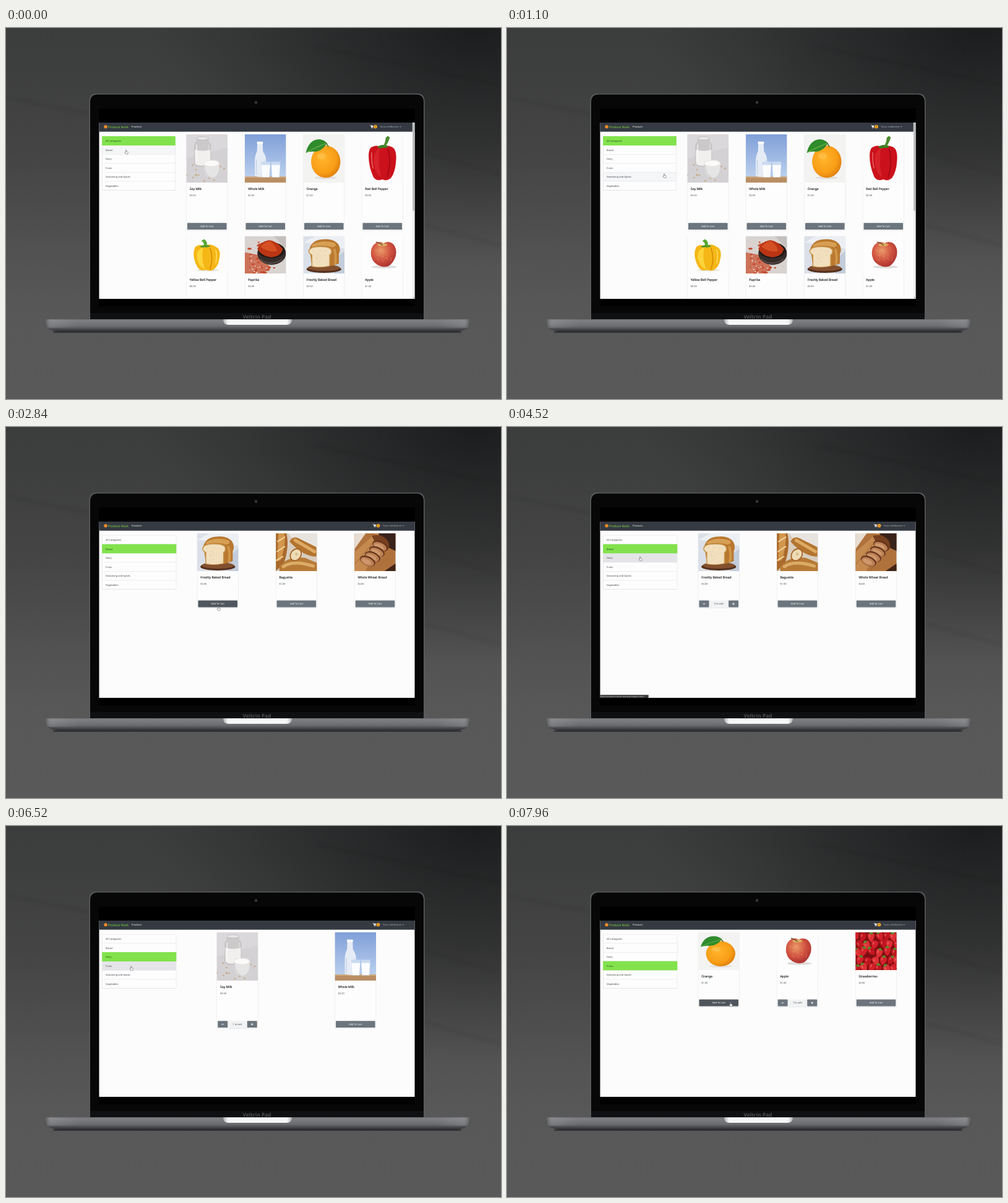
An HTML page for the animation above (8 s loop, 800x600 px).

```html
<!DOCTYPE html>
<html lang="en">
<head>
<meta charset="utf-8">
<title>Shop demo on a laptop</title>
<style>
html, body { margin: 0; width: 100%; height: 100%; overflow: hidden; background: #4a4a4a; }
svg { display: block; width: 100vw; height: 100vh; }
text { font-family: "Noto Sans", "Open Sans", sans-serif; text-rendering: geometricPrecision; }
.body { font-size: 3.95px; fill: #42464b; }
.title { font-size: 5.05px; fill: #212529; stroke: #212529; stroke-width: .14px; }
.btn { font-size: 3.95px; fill: #fff; text-anchor: middle; }
</style>
</head>
<body>
<svg id="stage" viewBox="0 0 800 600">
  <defs>
    <linearGradient id="wall" x1="0" y1="0" x2="0" y2="1">
      <stop offset="0" stop-color="#3b3c3c"/><stop offset=".33" stop-color="#444"/>
      <stop offset=".5" stop-color="#4c4c4c"/><stop offset=".65" stop-color="#545454"/>
      <stop offset=".78" stop-color="#585858"/><stop offset="1" stop-color="#595959"/>
    </linearGradient>
    <radialGradient id="dusk" gradientUnits="userSpaceOnUse" cx="760" cy="-20" r="540" gradientTransform="translate(0 6) scale(1 .72)">
      <stop offset="0" stop-color="#151617" stop-opacity=".85"/>
      <stop offset=".5" stop-color="#1d1e1f" stop-opacity=".5"/>
      <stop offset="1" stop-color="#2a2b2b" stop-opacity="0"/>
    </radialGradient>
    <linearGradient id="metal" x1="0" y1="0" x2="0" y2="1">
      <stop offset="0" stop-color="#6c6e71"/><stop offset=".12" stop-color="#7d7f82"/>
      <stop offset=".55" stop-color="#6a6c70"/><stop offset=".75" stop-color="#4d4f53"/>
      <stop offset="1" stop-color="#26282b"/>
    </linearGradient>
    <linearGradient id="ends" x1="0" y1="0" x2="1" y2="0">
      <stop offset="0" stop-color="#222" stop-opacity=".5"/><stop offset=".015" stop-color="#bbb" stop-opacity=".2"/>
      <stop offset=".08" stop-color="#bbb" stop-opacity="0"/><stop offset=".92" stop-color="#bbb" stop-opacity="0"/>
      <stop offset=".985" stop-color="#bbb" stop-opacity=".2"/><stop offset="1" stop-color="#222" stop-opacity=".5"/>
    </linearGradient>
    <linearGradient id="notch" x1="0" y1="0" x2="1" y2="0">
      <stop offset="0" stop-color="#aeb0b2"/><stop offset=".07" stop-color="#f6f6f6"/>
      <stop offset=".93" stop-color="#f6f6f6"/><stop offset="1" stop-color="#aeb0b2"/>
    </linearGradient>
    <linearGradient id="sky" x1="0" y1="0" x2="0" y2="1">
      <stop offset="0" stop-color="#7f9fd8"/><stop offset="1" stop-color="#c3d6f0"/>
    </linearGradient>
    <radialGradient id="peel" cx=".4" cy=".4" r=".65">
      <stop offset="0" stop-color="#ffb52c"/><stop offset=".7" stop-color="#f99d16"/><stop offset="1" stop-color="#dc7d0c"/>
    </radialGradient>
    <radialGradient id="skin" cx=".4" cy=".35" r=".7">
      <stop offset="0" stop-color="#eb9968"/><stop offset=".55" stop-color="#d0523f"/><stop offset="1" stop-color="#a8302f"/>
    </radialGradient>
    <filter id="soft" x="-20%" y="-200%" width="140%" height="500%"><feGaussianBlur stdDeviation="3"/></filter>
    <clipPath id="view"><rect x="150.5" y="153" width="510" height="285"/></clipPath>
  </defs>

  <rect width="800" height="600" fill="url(#wall)"/>
  <rect width="800" height="600" fill="url(#dusk)"/>
  <g filter="url(#soft)" fill="none" stroke="#000" stroke-opacity=".08" stroke-width="5">
    <path d="M0 112L140 140M500 30L800 92M676 200L800 238M676 318L800 352"/>
  </g>

  <path d="M134.500 471V119Q134.500 106 147 106H664Q676.500 106 676.500 119V471Z" fill="#5b5d5f"/>
  <path d="M136 471V120Q136 107.500 148 107.500H663Q675 107.500 675 120V471Z" fill="#070708"/>
  <rect x="150" y="130" width="511" height="320" fill="#000"/>
  <rect x="136" y="461" width="539" height="10" fill="#0f1011"/>
  <circle cx="404" cy="120.5" r="2.4" fill="#2b2c2e"/><circle cx="404" cy="120.5" r="1" fill="#505255"/>
  <text x="405.5" y="469.8" text-anchor="middle" font-size="8.4" font-weight="700" fill="#4b4d4f">Veltrin Pad</text>
  <rect x="76" y="490.500" width="660" height="2.500" rx="1.200" fill="#252628" opacity=".7"/>
  <g id="base">
    <path d="M62.500 473Q62.500 471 65 471H748Q750.500 471 750.500 473V482Q747 488 728 491.500H86Q66 488 62.500 482Z" fill="url(#metal)"/>
    <path d="M62.500 473Q62.500 471 65 471H748Q750.500 471 750.500 473V482L748 485H65L62.500 482Z" fill="url(#ends)"/>
  </g>
  <path d="M351 471.200H462Q462 480 453 480H360Q351 480 351 471.200Z" fill="url(#notch)"/>

  <g id="app" clip-path="url(#view)"></g>
</svg>
<script>
const LOOP = 8000;
const app = document.getElementById('app');
const CATEGORIES = ['All Categories', 'Bread', 'Dairy', 'Fruits', 'Seasoning and Spices', 'Vegetables'];
const ROW_H = 14.53, LIST_X = 155.5, LIST_Y = 175.3, CARD_W = 66.5, BTN_W = 63.6, BTN_H = 10.8;

const rect = (x, y, w, h, fill, more = '') => `<rect x="${x}" y="${y}" width="${w}" height="${h}" fill="${fill}" ${more}/>`;
const oval = (x, y, rx, ry, fill, more = '') => `<ellipse cx="${x}" cy="${y}" rx="${rx}" ry="${ry}" fill="${fill}" ${more}/>`;
const path = (d, fill, more = '') => `<path d="${d}" fill="${fill}" ${more}/>`;
const line = (d, stroke, w) => path(d, 'none', `stroke="${stroke}" stroke-width="${w}" stroke-linecap="round"`);
const text = (x, y, s, cls, more = '') => `<text x="${x}" y="${y}" class="${cls}" ${more}>${s}</text>`;

function seeded(seed) {
  return () => (seed = (seed * 16807) % 2147483647) / 2147483647;
}

// Scatters n shapes over a 66 x 60 picture.
function scatter(n, seed, draw) {
  const rnd = seeded(seed);
  return Array.from({ length: n }, () => draw(rnd() * 66, rnd() * 60, rnd())).join('');
}

function strawberries() {
  const rnd = seeded(77);
  let s = rect(0, 0, 66, 60, '#7d0d10');
  for (let r = 0; r < 5; r++) for (let c = 0; c < 6; c++) {
    const x = c * 12 + (r % 2) * 6 + rnd() * 3, y = r * 13 + 3 + rnd() * 4;
    s += `<g transform="translate(${x} ${y}) rotate(${rnd() * 70 - 35})">` +
      path('M-5.500 -4Q0 -8 5.500 -4Q6 4 0 8.500Q-6 4 -5.500 -4Z', ['#d3202a', '#c0161f', '#dd3035'][(r + c) % 3]) +
      oval(-2, -1, 1, 2.2, '#f0777a', 'opacity=".7"') +
      (rnd() > .55 ? path('M-4 -5L0 -8L4 -5L0 -3.500Z', '#5d8a2c') : '') + '</g>';
  }
  return s;
}

// Pictures are drawn in a 66 x 60 box and stretched to the card.
const ART = {
  soy: rect(0, 0, 66, 60, '#d3d1d3') + path('M0 0H66V16L0 30Z', '#dad8da') +
    scatter(18, 5, (x, y) => oval(x, 34 + y * .42, 1.5, 1, '#c8ad8f')) +
    path('M17 5H35V9Q39 11 39 15V36Q38 40 26 40Q14 40 13 36V15Q13 11 17 9Z', '#cbc9ca', 'stroke="#b5b3b4" stroke-width=".5"') +
    path('M13.500 19Q26 22 38.500 19V36Q37 39 26 39Q15 39 14 36Z', '#f2f0ee') +
    oval(26, 5, 9.5, 2, '#e9e8e8', 'stroke="#b5b3b4" stroke-width=".6"') + line('M16.500 13V33', '#fff', 1) + line('M36 13V18', '#eee', .8) +
    path('M27 36Q27 32 40 32Q53 32 53 36Q53 54 40 54Q27 54 27 36Z', '#e6e5e5') +
    oval(40, 36, 12, 3.4, '#fbfaf8') + line('M28 38Q29 51 38 53', '#bab8b8', .7),
  milk: rect(0, 0, 66, 60, 'url(#sky)') + rect(0, 52.5, 66, 7.5, '#b98e63') + rect(0, 52.5, 66, 1.5, '#d0aa80') +
    path('M20 11H28.500L29 21Q34 27 34 32V52Q25 54 16 52V32Q16 27 19.500 21Z', '#e6ecf5') +
    rect(19.5, 9, 9.5, 3, '#fff', 'rx=".6"') + line('M18.500 32V50', '#c3d2e7', 1.2) + line('M31.500 32V50', '#cddaeb', 1) +
    [26, 42].map(x => path(`M${x} 34H${x + 15}L${x + 13.5} 53.500H${x + 1.5}Z`, '#c9daf0') +
      path(`M${x + .5} 38H${x + 14.5}L${x + 13} 53H${x + 2}Z`, '#fbfcfe')).join(''),
  orange: rect(0, 0, 66, 60, '#f3f3f2') + oval(36, 54, 18, 1.8, '#e2e0dc') + oval(36, 34, 23.5, 20, 'url(#peel)') +
    oval(29, 27, 7, 4, '#ffc95c', 'opacity=".5"') +
    path('M4 23Q8 9 21 6.500Q32 5 38 11Q30 21 19 21.500Q10 21 4 23Z', '#2f8b2c') +
    line('M5 22.500Q20 16 37 11', '#78b950', .8) + line('M37 11L40 15', '#52702a', 1.5),
  redPepper: rect(0, 0, 66, 60, '#fcfcfc') +
    path('M14 17Q22 12 31 16Q40 12 49 16Q56 19 55 32Q54 47 47 54Q40 59 33 56Q24 59 18.500 53Q11 40 11 27Q11 20 14 17Z', '#cb111c') +
    path('M29 18Q25 36 31 53Q20 49 19 32Q19 20 29 18Z', '#dc2a30', 'opacity=".7"') + line('M42 18Q48 34 41 53', '#9d0914', 1.5) +
    line('M16 23Q15 32 18 42', '#f27a78', 1.2) + path('M25 15.500Q33 11 43 15Q39 18 33 16.500Q28 19 25 15.500Z', '#3d7d25') +
    path('M34 15Q38 10 38.500 4L42 2L45 4Q42 11 38 15Z', '#4c8a2e'),
  yellowPepper: rect(0, 0, 66, 60, '#fcfcfc') + oval(34, 54.5, 18, 1.8, '#e6e2d8') +
    path('M14 18Q20 12 28 16Q38 11 47 17Q56 21 53 36Q51 50 43 54Q38 57 32 54Q23 57 18 50Q10 36 12 24Z', '#f5b716') +
    path('M27 18Q23 36 30 53Q20 50 17 36Q15 22 27 18Z', '#ffd43a') + line('M38 19Q44 36 38 53', '#d68c08', 1.5) +
    line('M47 22Q50 32 47 43', '#ffdf62', 1.5) + path('M21 17Q29 12 39 16Q33 19 29 17.500Q25 19 21 17Z', '#4c9a2c') +
    path('M28 15Q29 11 24 8L28 5Q34 8 33 15Z', '#57a834'),
  paprika: rect(0, 0, 66, 60, '#d8d3d0') + path('M0 26L20 30L42 50L30 60H0Z', '#cc7258') + path('M46 0H66V20Z', '#c3c0be') +
    scatter(90, 12, (x, y, r) => oval(x * .72, 8 + y * .85, .8 + r * 1.8, .6 + r * .9, r > .5 ? '#c4472a' : '#e5cabf')) +
    oval(43, 28, 23, 18, '#362d2b') + line('M25 37Q41 50 60 37', '#6b605b', 1) +
    oval(42.5, 23, 21.5, 12.5, '#201917') +
    path('M20 20Q26 9 39 6.500Q53 9 61 21Q58 32 44 34Q27 33 20 20Z', '#bb3514') +
    path('M25 17Q32 9 40 8Q49 13 52 24Q38 27 25 17Z', '#d44f22'),
  bread: rect(0, 0, 66, 60, '#dbe0e8') + path('M0 10L20 0H66V20Z', '#eceff4') + path('M44 42L66 24V60H50Z', '#c3ccda') +
    oval(33, 53, 28, 6, '#54301d') + oval(33, 51, 26, 5, '#83502f') +
    path('M10 20Q14 7 29 5.500Q48 3 56 13Q61 21 57 29V44Q44 51 14 49Z', '#b9782f') +
    path('M14 14Q30 5 50 11Q55 15 48 18Q31 13 14 17Z', '#d79f54') + line('M50 22Q53 32 51 44', '#cf9548', 4) +
    path('M8 24Q9 16 27 16Q46 16 46 24Q46 29 43 31V48Q27 52 13 49V31Q8 28 8 24Z', '#c8964f') +
    path('M9.500 24.500Q11 17.500 27 17.500Q44.500 17.500 44.500 24.500Q44.500 28 41.500 30V47.500Q27 51 14.500 48V30Q9.500 27 9.500 24.500Z', '#f1dfbd') +
    scatter(18, 31, (x, y) => oval(16 + x * .36, 22 + y * .38, .8, .6, '#dfcaa2')),
  apple: rect(0, 0, 66, 60, '#fdfdfd') + oval(36, 49.5, 20, 2.3, '#dedbd9') +
    path('M35 11.500Q43 7 50 12.500Q57 20 54.500 32Q50 45 42 48.500Q36 50 31 48.500Q18 45 15 32Q13 17 23 11Q30 8 35 11.500Z', 'url(#skin)') +
    oval(33, 14, 8, 2.6, '#dbab62') + line('M33 15Q30 11 23 9.500', '#583923', 1.1) +
    scatter(24, 9, (x, y) => oval(21 + x * .45, 18 + y * .4, .5, .6, '#f0ad85')),
  baguette: rect(0, 0, 66, 60, '#d8cdbe') + path('M20 0H66V24L42 30Z', '#e7e4e0') +
    path('M0 0H17Q22 20 13 48L0 60Z', '#a9692c') + path('M4 0H14Q16 20 8 42L2 45Z', '#d3974c') +
    line('M3 13L14 6M2 29L14 21M1 43L11 37', '#f0d4a0', 2) +
    path('M22 13Q27 3 37 8L65 22V37Q44 37 22 13Z', '#b3742f') + line('M31 11L62 29', '#dfaa64', 5) +
    path('M5 53Q20 35 47 39L66 47V60H6Z', '#b77a36') + line('M12 53Q28 42 60 52', '#dcac67', 5) +
    oval(32, 34, 9, 11, '#a5652a', 'transform="rotate(38 32 34)"') + oval(32, 34, 7.2, 9.2, '#efdcb6', 'transform="rotate(38 32 34)"') +
    oval(33, 33, 2, 2.6, '#d6bc8b'),
  wheat: rect(0, 0, 66, 60, '#b0723c') + path('M0 60V30L34 0H54L17 60Z', '#c58a50') +
    line('M0 50L42 0M23 60L66 5', '#98602e', .8) + path('M0 0H18L0 25Z', '#e7ddd3') + path('M38 0H66V28L53 22Z', '#39231b') +
    path('M66 48L48 60H66Z', '#402517') + path('M28 4Q42 -1 53 11Q60 24 49 29Q36 24 28 4Z', '#77401f') +
    [[41, 20], [36, 29], [29, 37], [21, 44]].map(([x, y]) => `<g transform="rotate(24 ${x} ${y})">` +
      oval(x, y, 13, 7.5, '#63331b') + oval(x, y + 1, 11.5, 6.2, '#bd8055') + oval(x - 1, y + 1.5, 8, 3.5, '#ce986c') + '</g>').join(''),
  strawberries: strawberries()
};

const GOODS = {
  soy: ['Soy Milk', '3.50'], milk: ['Whole Milk', '2.50'], orange: ['Orange', '1.00'],
  redPepper: ['Red Bell Pepper', '0.50'], yellowPepper: ['Yellow Bell Pepper', '0.50'], paprika: ['Paprika', '5.00'],
  bread: ['Freshly Baked Bread', '3.00'], apple: ['Apple', '1.00'], baguette: ['Baguette', '1.00'],
  wheat: ['Whole Wheat Bread', '4.00'], strawberries: ['Strawberries', '2.00']
};

const row = (ids, x, step, y, imgH, cardH) => ids.map((id, i) => ({ id, x: x + i * step, y, imgH, cardH }));
const PAGES = [
  { from: 0, row: 0, cards: [
    ...row(['soy', 'milk', 'orange', 'redPepper'], 291.5, 94.5, 172, 78, 155),
    ...row(['yellowPepper', 'paprika', 'bread', 'apple'], 291.5, 94.5, 336.5, 60.5, 120)] },
  { from: 1720, row: 1, cards: row(['bread', 'baguette', 'wheat'], 309, 127.1, 172, 61, 120.3) },
  { from: 4640, row: 2, cards: row(['soy', 'milk'], 340.7, 190.8, 172, 78, 155) },
  { from: 6640, row: 3, cards: row(['orange', 'apple', 'strawberries'], 309, 127.1, 172, 61, 120.3) }
];

// Moments at which one piece of a product goes into the cart.
const ADDS = { bread: [2960, 3560, 3780], soy: [5740], apple: [7460] };
const PRESSES = [[1600, 1720], [4490, 4640], [6490, 6640]];
const STATUS = [[1560, 2250, 'bread'], [4420, 5460, 'dairy'], [6560, 7250, 'fruits']];
// Pointer stops: time, x, y of the tip.
const STOPS = [
  [0, 194, 197.5], [250, 196, 199], [1100, 254, 236], [1540, 207, 197], [1800, 207, 197], [2450, 336, 282],
  [2840, 343, 290.5], [3080, 344, 288], [3400, 365, 285], [3860, 365, 285], [4270, 216, 213], [4450, 215, 210],
  [4700, 215, 210], [5340, 345, 251.5], [5640, 373, 319], [5860, 373, 319], [6400, 202, 227], [6700, 202, 227],
  [7330, 468, 284], [7560, 468, 284], [7920, 361, 285.5], [8000, 361, 285.5]
];

const within = (t, [a, b]) => t >= a && t < b;
const count = (id, t) => (ADDS[id] || []).filter(at => t >= at).length;

function pointer(t) {
  const i = Math.max(1, STOPS.findIndex(s => s[0] > t));
  const [t0, x0, y0] = STOPS[i - 1], [t1, x1, y1] = STOPS[i];
  const u = (t - t0) / (t1 - t0), e = u * u * (3 - 2 * u);
  return [x0 + (x1 - x0) * e, y0 + (y1 - y0) * e];
}

function button(x, y, w, label, over) {
  return rect(x, y, w, BTN_H, over ? '#50565d' : '#6c757d', 'rx=".8"') + text(x + w / 2, y + 6.8, label, 'btn');
}

function cardButtons(c, t, mx, my) {
  const x = c.x + 1.5, y = c.y + c.cardH - 11.7, right = x + BTN_W - 16, n = count(c.id, t);
  const over = (bx, w) => mx >= bx && mx <= bx + w && my >= y && my <= y + 11.5;
  if (!n) return button(x, y, BTN_W, 'Add To Cart', over(x, BTN_W));
  return rect(x, y, BTN_W, BTN_H, '#f1f2f3') + button(x, y, 16, '', over(x, 16)) + button(right, y, 16, '', over(right, 16)) +
    line(`M${x + 6.5} ${y + 5.4}h3M${right + 6.5} ${y + 5.4}h3M${right + 8} ${y + 3.9}v3`, '#fff', .9) +
    text(x + BTN_W / 2, y + 6.8, `${n} in cart`, 'btn', 'style="fill:#33383c"');
}

function cardFace(c) {
  const [name, price] = GOODS[c.id];
  return rect(c.x - .2, c.y + .5, CARD_W + .4, c.cardH + .3, '#e4e4e8', 'rx="1"') + rect(c.x + .3, c.y + .3, CARD_W - .6, c.cardH - .6, '#fdfdfd') +
    `<svg x="${c.x}" y="${c.y}" width="${CARD_W}" height="${c.imgH}" viewBox="0 0 66 60" preserveAspectRatio="none">${ART[c.id]}</svg>` +
    text(c.x + 5.3, c.y + c.imgH + 11.7, name, 'title') + text(c.x + 5.3, c.y + c.imgH + 21.9, '$' + price, 'body');
}

function list(page, w, hover, pressed) {
  const h = ROW_H * CATEGORIES.length;
  return rect(LIST_X - .3, LIST_Y, w + .6, h + .6, '#e0e0e3', 'rx="1"') + CATEGORIES.map((name, i) => {
    const y = LIST_Y + i * ROW_H, active = i === page.row;
    const fill = i === hover ? (pressed ? '#e5e5e9' : '#f5f6f8') : '#fdfdfd';
    return (active ? rect(LIST_X - .3, y - .3, w + .6, ROW_H + .4, '#82e24c') : rect(LIST_X + .2, y + .2, w - .4, ROW_H - .5, fill)) +
      text(161, y + 8.7, name, 'body', active ? 'style="fill:#234d16"' : '');
  }).join('');
}

function header(shift, items) {
  return rect(150, 152, 511, 15.7, '#353a42') + `<circle cx="161" cy="159.800" r="2.700" fill="#f08a2c"/>` +
    text(164.8, 161.6, 'Produce Nook', 'body', 'style="font-size:5px;fill:#7ddc3c"') +
    text(203, 161.2, 'Products', 'body', 'style="fill:#f4f4f4"') +
    `<g transform="translate(${shift} 0)">` + line('M588.600 157.300H589.600L590.400 160.600H593', '#fff', .6) +
    path('M589.800 157.800H593.600L592.900 160H590.300Z', '#fff') + oval(590.7, 161.6, .6, .6, '#fff') + oval(592.7, 161.6, .6, .6, '#fff') +
    oval(597, 159.6, 2.9, 2.9, '#f3a524') + text(597, 160.9, items, 'btn', 'style="font-size:3.6px;fill:#4d3a14"') +
    text(604, 161.2, 'Toma Veldkamer', 'body', 'style="fill:#a0a4a9"') + path('M636 159H638.600L637.300 160.400Z', '#a0a4a9') + '</g>';
}

const HAND = 'M-.6 0Q.2 -.8 .8 0V2.600L3.300 3.200Q4 3.600 3.800 4.600L3.200 7.200H-.400L-2.200 4.600Q-2.200 3.600 -.6 4.300Z';
const ARROW = 'M0 0V6L1.400 4.800L2.400 6.900L3.300 6.500L2.400 4.500H4.200Z';

app.innerHTML = rect(150, 152, 511, 287, '#fcfcfc') + PAGES.map(p => `<g>${p.cards.map(cardFace).join('')}</g>`).join('') + '<g></g>';
const faces = [...app.children].slice(1, 1 + PAGES.length);
const live = app.lastElementChild;

function update(t) {
  const index = PAGES.filter(p => t >= p.from).length - 1, page = PAGES[index];
  const [mx, my] = pointer(t), wide = index > 0;
  const listW = wide ? 119.5 : 118;
  const inList = mx > LIST_X && mx < LIST_X + listW && my > LIST_Y && my < LIST_Y + ROW_H * CATEGORIES.length;
  const hover = inList ? Math.floor((my - LIST_Y) / ROW_H) : -1;
  const pressed = PRESSES.some(p => within(t, p));
  const onButton = page.cards.some(c => mx > c.x && mx < c.x + CARD_W && my > c.y + c.cardH - 12 && my < c.y + c.cardH);
  const status = STATUS.find(s => within(t, s));
  const items = Object.keys(ADDS).reduce((sum, id) => sum + count(id, t), 0);

  faces.forEach((g, i) => g.setAttribute('display', i === index ? 'inline' : 'none'));
  live.innerHTML = header(wide ? 4.5 : 0, items) + list(page, listW, hover, pressed) +
    page.cards.map(c => cardButtons(c, t, mx, my)).join('') +
    (wide ? '' : rect(656.8, 152.5, 4, 286, '#f0f0f0') + rect(657.2, 154, 3, 141.5, '#b9babb') + path('M657.500 435.500H660L658.750 437Z', '#666')) +
    (status ? rect(150, 433.2, 78.7, 6, '#3a3b3e') +
      text(151.3, 437.1, `https://produce-nook-e41.web.app/?category=${status[2]}`, 'body', 'style="font-size:2.9px;fill:#ececec"') : '') +
    path(inList || onButton ? HAND : ARROW, '#fff', `transform="translate(${mx} ${my}) scale(.88)" stroke="#3a3d40" stroke-width=".55" stroke-linejoin="round"`);
}

const start = performance.now();
function tick() {
  update((performance.now() - start) % LOOP);
  requestAnimationFrame(tick);
}
tick();
</script>
</body>
</html>
```
